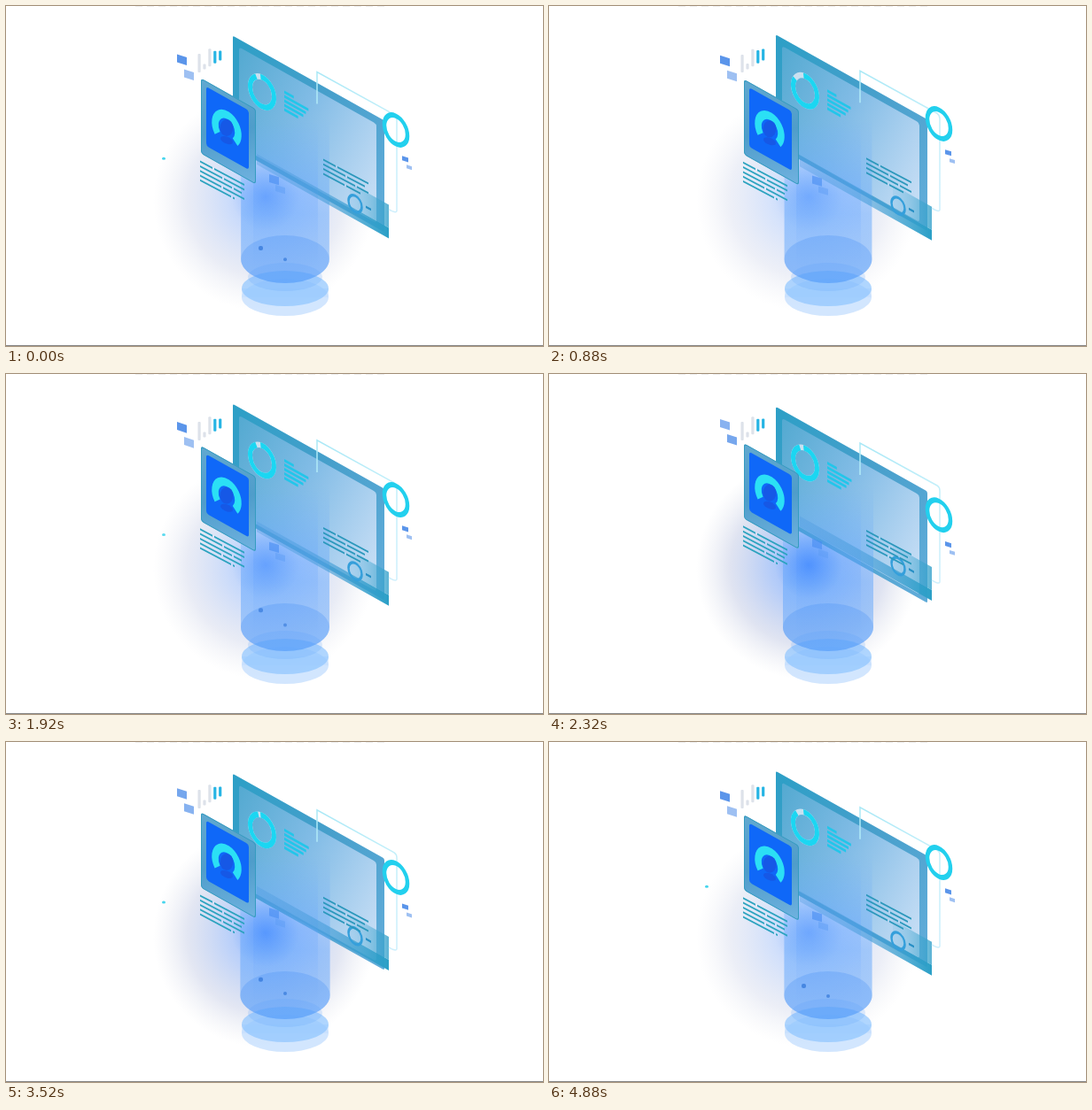
Animation, 606 px wide and 384 px high, one loop 4960 ms. Source, as an HTML page with a canvas:

```html
<!DOCTYPE html>
<html lang="en">
<head>
<meta charset="utf-8">
<title>Floating dashboard</title>
<style>
html, body { margin: 0; width: 606px; height: 384px; overflow: hidden; background: #fff; }
canvas { display: block; }
</style>
</head>
<body>
<canvas id="stage" width="606" height="384"></canvas>
<script>
const ctx = document.getElementById('stage').getContext('2d');
const LOOP = 4960, TAU = Math.PI * 2, SLOPE = 0.56;
const CYAN = '#1bd6f2', PALE = '#c9e0f0';

// [time, value] pairs; lift drives every floating layer, sweep the charts
const LIFT = [[0, 14], [880, 7], [1400, 4], [1920, 16], [2800, 48], [3520, 27], [4080, 0], [4880, 10]];
const SWEEP = [[0, .94], [320, .5], [380, .52], [680, .94], [880, .86], [1040, .97], [1160, .9]];
const BARS = [[0, 0], [220, .85], [320, 1], [400, 1], [600, .12], [680, 0], [880, .1], [1040, 0]];

// Periodic Hermite interpolation with slopes limited at turning points
function curve(keys, period, time) {
  const n = keys.length, t = time % period;
  const at = i => {
    const turn = Math.floor(i / n), k = keys[i - turn * n];
    return [k[0] + turn * period, k[1]];
  };
  let i = n - 1;
  while (keys[i][0] > t) i--;
  const [a, b, c, d] = [-1, 0, 1, 2].map(j => at(i + j));
  const grade = (p, q) => (q[1] - p[1]) / (q[0] - p[0]);
  const slope = (l, r) => l * r <= 0 ? 0 : 2 * l * r / (l + r);
  const h = c[0] - b[0], u = (t - b[0]) / h, mid = grade(b, c);
  const m0 = slope(grade(a, b), mid) * h, m1 = slope(mid, grade(c, d)) * h;
  const s = u * u * (3 - 2 * u);
  return b[1] + (c[1] - b[1]) * s + m0 * u * (1 - u) ** 2 - m1 * u * u * (1 - u);
}

function plane(x, y, draw, slope = SLOPE) {
  ctx.save();
  ctx.transform(1, slope, 0, 1, x, y);
  draw();
  ctx.restore();
}

function rect(x, y, w, h, fill, r = 0) {
  ctx.fillStyle = fill;
  ctx.beginPath();
  ctx.roundRect(x, y, w, h, r);
  ctx.fill();
}

function ellipse(x, y, rx, ry, fill) {
  ctx.fillStyle = fill;
  ctx.beginPath();
  ctx.ellipse(x, y, rx, ry, 0, 0, TAU);
  ctx.fill();
}

function gradient(x0, y0, x1, y1, ...colors) {
  const g = ctx.createLinearGradient(x0, y0, x1, y1);
  colors.forEach((c, i) => g.addColorStop(i / (colors.length - 1), c));
  return g;
}

function ring(x, y, r, width, color, from = 0, part = 1) {
  plane(x, y, () => {
    ctx.scale(1, 1.22);
    ctx.strokeStyle = color;
    ctx.lineWidth = width;
    ctx.beginPath();
    ctx.arc(0, 0, r, from, from + TAU * part);
    ctx.stroke();
  }, .46);
}

function paragraph(x, y, widths, color) {
  plane(x, y, () => widths.forEach((w, i) => {
    const gap = 14 + i * 11 % 23;
    rect(0, i * 5.3, gap, 2, color);
    rect(gap + 2, i * 5.3, Math.max(0, w - gap - 2), 2, color);
  }), .53);
}

function glow(lift) {
  const dark = .2 + lift / 48 * .36;
  const g = ctx.createRadialGradient(293, 215, 0, 291, 220, 125);
  g.addColorStop(0, `rgba(60,130,255,${dark + .15})`);
  g.addColorStop(.35, `rgba(95,145,240,${dark})`);
  g.addColorStop(.7, `rgba(140,155,205,${dark * .6})`);
  g.addColorStop(1, 'rgba(185,190,210,0)');
  ellipse(291, 220, 125, 125, g);
}

function screen(y, sweep) {
  plane(256, y, () => {
    rect(0, 0, 171, 126, gradient(0, 0, 171, 90, '#2c9fc6', '#469fcb', '#5fabd8'), 2);
    rect(7, 9, 155, 112, gradient(0, 10, 165, 75, '#50a8cf', '#82bce6', '#c3dcf4'), 3);
  });
  ring(289, y + 63.5, 13.5, 5, PALE);
  ring(289, y + 63.5, 13.5, 5, CYAN, -1.7, sweep);
  plane(314, y + 62, () => [11, 28, 25, 22, 16].forEach((w, i) =>
    rect(0, i * 5, w * (.6 + .4 * sweep), 3, '#22c6ea')));
}

function column(lift) {
  const half = 49 + lift * .06, left = 315 - half, right = 315 + half;
  ctx.fillStyle = gradient(0, 125, 0, 235, 'rgba(95,165,252,0)', 'rgba(95,165,252,.5)');
  ctx.beginPath();
  ctx.moveTo(left, 125);
  ctx.lineTo(left, 286);
  ctx.ellipse(315, 286, half, 27, 0, Math.PI, 0, true);
  ctx.lineTo(right, 125);
  ctx.fill();
  rect(279, 130, 73, 165, gradient(0, 130, 0, 295,
    'rgba(95,165,255,0)', 'rgba(95,160,255,.24)', 'rgba(95,160,255,0)'));
  const core = ctx.createRadialGradient(293, 216, 0, 293, 216, 38);
  core.addColorStop(0, `rgba(35,115,255,${.1 + lift / 100})`);
  core.addColorStop(1, 'rgba(50,130,255,0)');
  ellipse(293, 216, 38, 38, core);
  ellipse(315, 286, half, 27, 'rgba(65,140,245,.28)');
}

function base() {
  ellipse(315, 329, 49, 21, 'rgba(195,222,254,.75)');
  rect(266, 319, 98, 10, 'rgba(195,222,254,.5)');
  ellipse(315, 319, 49, 20, 'rgba(140,196,255,.68)');
  ellipse(315, 306, 42, 16, 'rgba(90,160,250,.2)');
}

function frontPanel(lift) {
  const bottom = 267 - lift * .33;
  plane(283, bottom - 149 * SLOPE, () => {
    rect(0, -12, 149, 12, gradient(0, 0, 149, 0, 'rgba(80,155,225,.35)', 'rgba(65,155,215,.55)', '#2a9fc6'));
    rect(105, -38, 44, 26, gradient(105, 0, 149, 0, 'rgba(100,180,220,.15)', 'rgba(50,160,202,.8)'));
  });
  ring(394, bottom - 39, 7.5, 2.5, '#359fdb');
  plane(406, bottom - 37, () => rect(0, 0, 6, 2.5, '#278fc5'));
  const y = 199 - lift * .21;
  plane(297, y - 6, () => rect(0, 0, 11, 9, 'rgba(70,140,242,.6)'), .3);
  plane(304, y + 6, () => rect(0, 0, 11, 7, 'rgba(90,155,245,.45)'), .3);
}

function card(y) {
  plane(220, y, () => {
    rect(0, 0, 62, 85, gradient(0, 0, 62, 85, '#62a9d0', '#4f9dca', '#70b2e0'), 3);
    ctx.strokeStyle = '#359cc0';
    ctx.lineWidth = 1;
    ctx.beginPath();
    ctx.roundRect(.5, .5, 61, 84, 3);
    ctx.stroke();
    rect(6, 6, 48, 67, '#0f68f8', 3);
  });
  ring(249, y + 57, 13, 7.5, '#2be0f5', 2.5, .72);
  ellipse(249, y + 56, 7.5, 9.5, '#1658e6');
  plane(249, y + 70, () => ellipse(0, 0, 7, 4, '#1658e6'), .3);
  paragraph(219, y + 93, [50, 50, 47, 50, 39], '#2ba3bf');
}

function barChart(grow) {
  const low = [21, 6, 20, 14, 11], high = [10, 13, 14, 22, 29];
  low.forEach((h, i) => {
    const height = h + (high[i] - h) * grow;
    rect(216.5 + i * 5.9, 75 - i * 3.4 - height, 3.2, height, i < 3 ? '#dde2ea' : '#25b4e4', 1);
  });
}

function chips(lift) {
  const y = 65 - lift * .18, swap = Math.min(1, Math.max(0, (lift - 18) / 26));
  const chip = (x, top, w, h, alpha) =>
    plane(x, top, () => rect(0, 0, w, h, `rgba(62,130,230,${alpha})`), .32);
  chip(193, y - 8, 11, 9, .85 - swap * .4);
  chip(201, y + 9, 11, 9, .5 + swap * .35);
  const side = 156 + lift * 1.02;
  chip(447, side - 1, 7, 5, .85);
  chip(452, side + 9, 6, 4, .5);
}

function outline(y) {
  ctx.strokeStyle = gradient(351, y, 441, y + 150, '#a9e8f6', '#c2effa', '#cdeffc');
  ctx.lineWidth = 1.5;
  ctx.beginPath();
  ctx.moveTo(351, y + 36);
  ctx.lineTo(351, y);
  ctx.lineTo(438, y + 48);
  ctx.quadraticCurveTo(441, y + 50, 441, y + 54);
  ctx.lineTo(441, y + 157);
  ctx.quadraticCurveTo(440, y + 160, 432, y + 155);
  ctx.stroke();
}

function sparks(time) {
  const age = (time + 400) % (LOOP / 3);
  if (age > 800) return;
  const rise = Math.max(0, age - 320);
  ctx.globalAlpha = Math.min(1, age / 200, (800 - age) / 150);
  ellipse(178, 183 - 20 * Math.exp(-rise / 130), 2, 1.5, '#45d5ed');
  const drift = 10 * Math.min(1, rise / 400);
  rect(285, 273 - drift, 5, 5, 'rgba(45,115,215,.7)', 2);
  rect(313, 285 - drift * .4, 4, 4, 'rgba(45,115,215,.65)', 2);
  ctx.globalAlpha = 1;
}

function draw(now) {
  const time = now % LOOP;
  const lift = curve(LIFT, LOOP, time), sweep = curve(SWEEP, LOOP / 4, time);
  const top = 31 + lift * .18;
  rect(0, 0, 606, 384, '#fff');
  glow(lift);
  base();
  screen(top, sweep);
  column(lift);
  frontPanel(lift);
  paragraph(358, top + 139, [51, 47, 51, 42], '#2b98bc');
  outline(top + 41);
  ring(440, 126 + lift, 13, 4.5, '#22d0ee');
  card(84 - lift * .17);
  barChart(curve(BARS, LOOP / 4, time));
  chips(lift);
  sparks(time);
  for (let x = 146; x < 432; x += 13) rect(x, 0, 8, 1, '#eeeeee');
  rect(0, 383, 606, 1, '#858585');
  requestAnimationFrame(draw);
}
requestAnimationFrame(draw);
</script>
</body>
</html>
```
